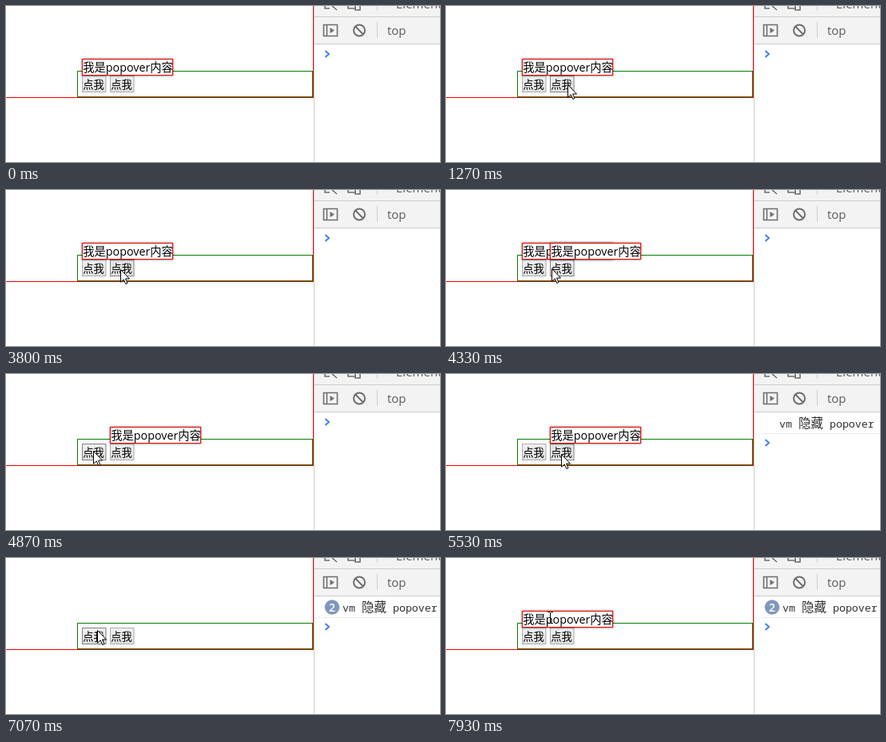
Write an HTML page that moves like this. It is 543 px wide and 195 px high and loops after 8000 ms.

```html
<!DOCTYPE html>
<html lang="zh">
<head>
<meta charset="utf-8">
<style>
  html, body { margin: 0; width: 100%; height: 100%; overflow: hidden; background: #fff; }
  svg { display: block; }
  text { font-family: "Open Sans", "Noto Sans CJK SC", "Noto Sans CJK", sans-serif; white-space: pre; }
  .lines { shape-rendering: crispEdges; fill: none; }
  .pop rect { fill: #fff; stroke: red; filter: drop-shadow(0 0 1.5px rgba(0, 0, 0, .6)); }
  .pop text { font-size: 14.3px; }
  .btn rect { fill: url(#face); stroke: #adadad; }
  .btn.hover rect { stroke: #808080; }
  .btn.down rect { fill: #e4e4e4; }
  .btn text { font-size: 13.33px; }
  .ui { fill: #5a5a5a; font-size: 15px; }
  .icons { fill: none; stroke: #6e6e6e; stroke-width: 1.6; }
  .log { font: 13.3px "Noto Sans Mono", "Noto Sans CJK SC", "Noto Sans CJK", monospace; fill: #303030; }
</style>
</head>
<body>
<svg width="543" height="195" viewBox="0 0 543 195">
  <defs>
    <linearGradient id="face" x2="0" y2="1">
      <stop stop-color="#f1f1f1"/><stop offset="1" stop-color="#dfdfdf"/>
    </linearGradient>
  </defs>

  <!-- page -->
  <g class="lines">
    <rect x="89.5" y="81.5" width="294" height="32" stroke="green"/>
    <path d="M384.5 0V114.5H0" stroke="red"/>
  </g>
  <g id="buttons"></g>
  <g id="pops"></g>

  <!-- developer tools -->
  <path d="M386 0H543V47H386Z" fill="#f3f3f3"/>
  <path class="lines" d="M385.5 0V195M386 13.5H543M386 47.5H543M464.5 0V6M464.5 20V40" stroke="#ccc"/>
  <g class="icons">
    <path d="M399 0V3H405M408 0L414 5M428 0V3H437M437 0V5H443V0"/>
    <path d="M397.5 23.5H414.5V37.5H397.5ZM401.5 23V38"/>
    <path d="M405.5 27V34L411 30.5Z" fill="#6e6e6e" stroke="none"/>
    <g stroke-width="2"><circle cx="442" cy="30.5" r="7"/><path d="M437 25.5L447 35.5"/></g>
  </g>
  <text class="ui" x="488" y="3">Elements</text>
  <text class="ui" x="477" y="36">top</text>
  <g id="log">
    <path class="lines" d="M386 74.5H543" stroke="#ececec"/>
    <text id="message" class="log" y="67">vm <tspan font-size="15.5">隐藏</tspan> popover</text>
    <g id="badge">
      <circle cx="408" cy="61.5" r="9.3" fill="#8097bd"/>
      <text x="408" y="66.5" text-anchor="middle" font-size="14" font-weight="600" fill="#fff">2</text>
    </g>
  </g>
  <path id="prompt" d="M399.5 56L404 60L399.5 64" fill="none" stroke="#3f80ee" stroke-width="2"/>

  <!-- pointers -->
  <path id="arrow" d="M.5 .5V16.2L4.2 12.8L6.8 18.5L9 17.5L6.5 12H11.5Z" fill="#fff" stroke="#000"/>
  <path id="beam" class="lines" d="M-3 -6.5H0M1 -6.5H4M.5 -6V7M-3 7.5H0M1 7.5H4" stroke="#000"/>
</svg>
<script>
const LOOP = 8000, STEP = 1000 / 15;
const $ = id => document.getElementById(id);
const lefts = [95, 130];

// pointer moves; swing bends the way down, then up
const moves = [
  { from: 533, to: 733, x: 167, y: 122 },
  { from: 800, to: 1267, x: 152, y: 98 },
  { from: 1600, to: 1933, x: 143, y: 106 },
  { from: 2600, to: 2867, x: 143, y: 99 },
  { from: 4133, to: 4667, x: 109, y: 96 },
  { from: 5000, to: 5533, x: 144, y: 100 },
  { from: 6333, to: 7200, x: 112, y: 95, swing: 15 },
  { from: 7667, to: 7933, x: 130, y: 74 }
];

const clicks = [
  { button: 1, down: 3800, up: 3867 },
  { button: 0, down: 4667, up: 4867 },
  { button: 1, down: 5533, up: 5667 },
  { button: 0, down: 7333, up: 7533 }
];

const show = (el, on) => el.style.display = on ? "" : "none";

const repeat = (kind, y, rect, label) => {
  const group = $(kind + "s");
  group.innerHTML = lefts.map(x => `<g class="${kind === "button" ? "btn" : "pop"}"
    transform="translate(${x} ${y})"><rect x=".5" y=".5" width="${rect}" height="20"/>
    <text x="1.2" y="16">${label}</text></g>`).join("");
  return [...group.children];
};
const buttons = repeat("button", 87, 29.5, "点我");
const pops = repeat("pop", 66, 113, "我是popover内容");

function pointer(t) {
  let x = 119, y = 205;
  for (const m of moves) {
    const p = Math.min(1, Math.max(0, (t - m.from) / (m.to - m.from)));
    const k = p * p * (3 - 2 * p);
    x += (m.x - x) * k;
    y += (m.y - y) * k + (m.swing || 0) * Math.sin(2 * Math.PI * k);
  }
  return [Math.round(x), Math.round(y)];
}

function draw(now) {
  const t = Math.floor((now % LOOP + 4) / STEP) * STEP + 1;
  const [x, y] = pointer(t);

  lefts.forEach((left, i) => {
    const own = clicks.filter(c => c.button === i);
    const toggles = own.filter(c => t >= c.up).length;
    const over = x >= left && x < left + 31 && y >= 87 && y < 108;
    buttons[i].classList.toggle("hover", over);
    buttons[i].classList.toggle("down", own.some(c => t >= c.down && t < c.up));
    // the first popover starts open, the second closed
    show(pops[i], (toggles + i) % 2 === 0);
  });

  const text = t > 7600 && y < 87;
  show($("arrow"), !text);
  show($("beam"), text);
  $(text ? "beam" : "arrow").setAttribute("transform", `translate(${x} ${y})`);

  const logged = t >= 4933, twice = t >= 5667;
  show($("log"), logged);
  show($("badge"), twice);
  $("message").setAttribute("x", twice ? 421 : 417);
  $("prompt").setAttribute("transform", `translate(0 ${logged ? 26 : 0})`);
}

const start = performance.now();
function tick() {
  draw(performance.now() - start);
  requestAnimationFrame(tick);
}
tick();
</script>
</body>
</html>
```
